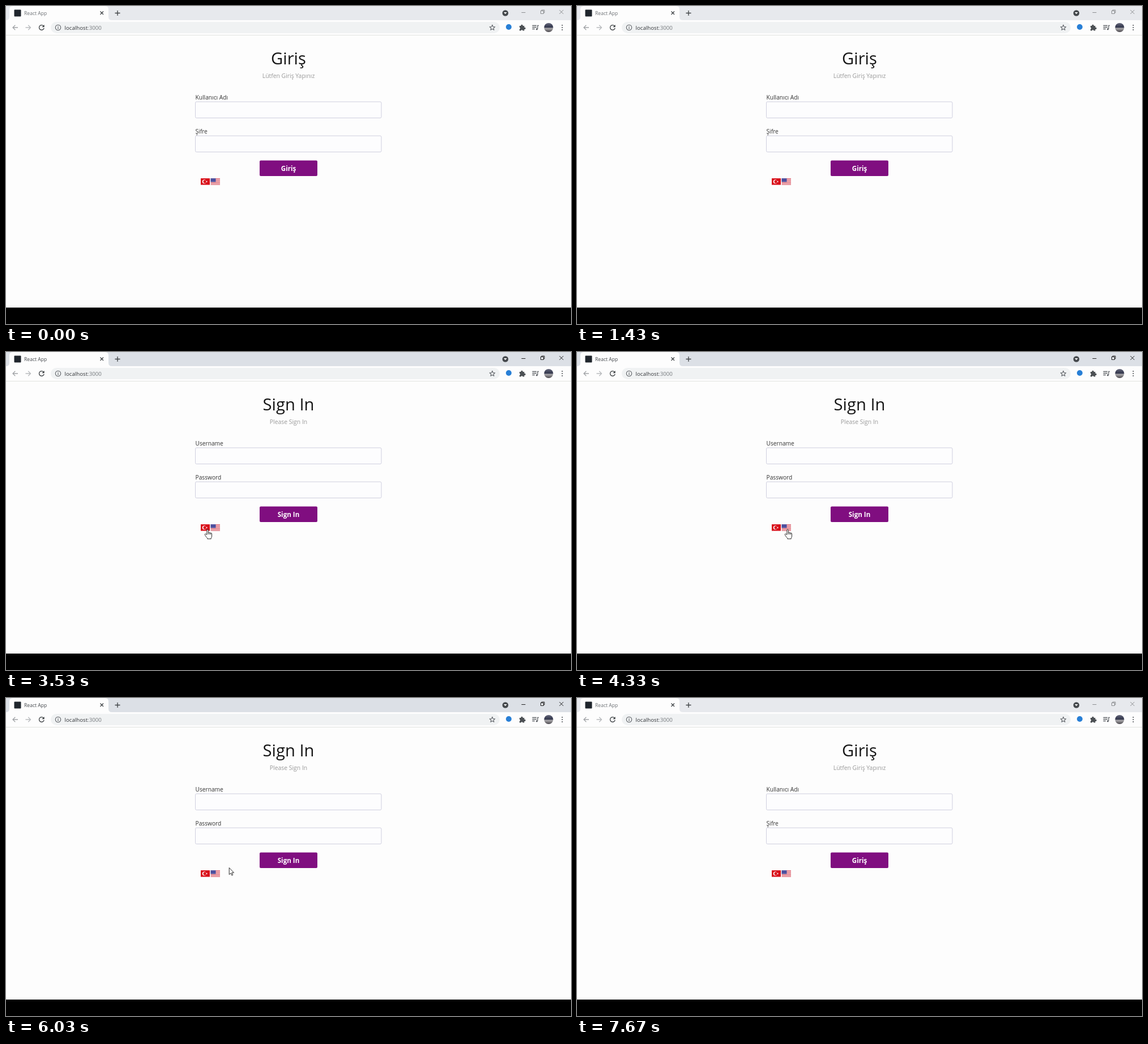
Recreate the animation shown at these times as an HTML page. Size 998 px wide and 561 px high, loop 7.74 s.

```html
<!DOCTYPE html>
<html lang="en">
<head>
<meta charset="utf-8">
<title>Login form</title>
<style>
  html, body { margin: 0; width: 100%; height: 100%; overflow: hidden; background: #000; }
  svg { display: block; width: 998px; height: 561px; }
  text { font-family: "Open Sans", "Noto Sans", sans-serif; }
  .line { fill: none; stroke: #5f6368; stroke-width: 1.3; }
  .mid { text-anchor: middle; }
  .label { font-size: 10.2px; fill: #333; }
  .field { fill: #fdfdfe; stroke: #cfcfdf; }
</style>
</head>
<body>
<svg viewBox="0 0 998 561">
  <rect width="998" height="532" fill="#fdfdfd"/>

  <rect id="strip" width="998" height="26"/>
  <path d="M0 25q6 0 6-6V6q0-6 6-6h163q6 0 6 6v13q0 6 6 6z" fill="#fdfdfd"/>
  <rect y="25" width="998" height="26" fill="#fdfdfd"/>
  <path d="M0 51.5h998" stroke="#e2e3e0"/>
  <rect x="14.5" y="6.5" width="12" height="12" rx="1" fill="#20262d"/>
  <text id="tab" x="32" y="15.5" font-size="8.6">React App</text>
  <path class="line" d="M166.500 9.500l5.500 5.500m0-5.500l-5.500 5.500" style="stroke:#3c4043"/>
  <path class="line" d="M192.500 12.500h9m-4.500-4.500v9" style="stroke:#3c4043"/>
  <circle cx="882" cy="12.500" r="5.300" fill="#45494d"/>
  <path d="M879.200 11h5.600l-2.800 3.300z" fill="#fff"/>
  <path id="controls" fill="none" d="M910.500 11.500h7M944.500 8.500h5v5h-5zM946 8.500v-1.500h5v5h-1.500M977.500 7l7 7m0-7l-7 7"/>

  <rect x="79" y="28" width="793" height="20" rx="10" fill="#f0f2f3"/>
  <path class="line" style="stroke:#a0a3a6" d="M21 38h-9m4.300-4.300l-4.300 4.300 4.300 4.300"/>
  <path class="line" style="stroke:#b8babd" d="M34.500 38h9m-4.300-4.300l4.300 4.300-4.300 4.300"/>
  <path class="line" style="stroke:#3c4043" d="M66.200 35a4.400 4.400 0 1 0 1 4"/>
  <path d="M67.700 33v4.300h-4.300z" fill="#3c4043"/>
  <circle class="line" cx="92" cy="38" r="4.700" style="stroke-width:1.100"/>
  <path d="M92 37.200v3.600M92 35v1.300" stroke="#5f6368" stroke-width="1.200"/>
  <text x="103.500" y="41.500" font-size="9.700" fill="#33363a">localhost<tspan fill="#74787c">:3000</tspan></text>
  <path id="star" class="line" style="stroke-width:1.100" stroke-linejoin="round"/>
  <circle cx="888" cy="37" r="5" fill="#287fd6"/>
  <path fill="#4c5054" d="M907 35h2.600a1.700 1.700 0 1 1 3.200 0h2.700v2.800a1.700 1.700 0 1 1 0 3.200v2.500h-2.600a1.800 1.800 0 0 0-3.400 0H907v-2.600a1.800 1.800 0 0 0 0-3.400z"/>
  <path class="line" d="M929.500 34.500h7.500m-7.500 3h7.500m-7.500 3h4.500M941 34.500h-2v6"/>
  <circle cx="937.600" cy="40.800" r="1.600" fill="#5f6368"/>
  <linearGradient id="photo" x2="0" y2="1">
    <stop stop-color="#66697c"/><stop offset=".45" stop-color="#30344a"/>
    <stop offset=".6" stop-color="#aaa8ab"/><stop offset="1" stop-color="#47454a"/>
  </linearGradient>
  <circle cx="958.500" cy="38" r="8" fill="url(#photo)"/>
  <path d="M982.500 34v8.500" stroke="#505458" stroke-width="2.200" stroke-linecap="round" stroke-dasharray="0 4"/>

  <text id="title" class="mid" x="499" y="103" font-size="29.200" font-weight="500" fill="#151515"/>
  <text id="hint" class="mid" x="499" y="127" font-size="10.400" fill="#999"/>
  <text id="user" class="label" x="334.500" y="165"/>
  <rect class="field" x="334.500" y="169" width="328.500" height="28.500" rx="2"/>
  <text id="pass" class="label" x="334.500" y="225"/>
  <rect class="field" x="334.500" y="229" width="328.500" height="28.500" rx="2"/>
  <rect x="448" y="272.500" width="102" height="27.500" rx="2" fill="#800e80"/>
  <text id="submit" class="mid" x="499" y="291" font-size="11.600" font-weight="700" fill="#fff"/>

  <g transform="translate(344 304)">
    <rect width="16" height="11.500" fill="#d9101b"/>
    <circle cx="6.300" cy="5.800" r="3.500" fill="#fff"/>
    <circle cx="7.300" cy="5.800" r="2.800" fill="#d9101b"/>
    <circle cx="10.400" cy="5.800" r="1.100" fill="#fff"/>
  </g>
  <g transform="translate(361.500 304)">
    <rect width="16.500" height="11.500" fill="#fff"/>
    <path id="stripes" stroke="#d33b4b" stroke-width=".9"/>
    <rect width="9" height="6.400" fill="#4c509f"/>
  </g>

  <g id="cursor" fill="#fff" stroke="#222" stroke-width=".95" stroke-linejoin="round">
    <path id="arrow" d="M.4 .4v12l2.800-2.500 1.900 4 1.800-.8-1.900-4h3.700z"/>
    <path id="hand" d="M-1.200 9.500V1.300q0-1.300 1.200-1.300t1.200 1.300v4q1.300-.9 2.200.5 1.400-.8 2.100.6 2-.5 2 1.400v4.200q0 1.700-1.300 3.200v1.500h-6.500v-1.300q-1.600-1.300-4.400-5.800-.5-1.300.6-1.700 1.200-.3 2.900 1.600zM1.200 5.300v3.400M3.400 5.800v3M5.500 6.400v2.600"/>
  </g>
</svg>
<script>
const LOOP = 7740;
const $ = id => document.getElementById(id);

const TEXT = {
  tr: { title: "Giriş", hint: "Lütfen Giriş Yapınız", user: "Kullanıcı Adı", pass: "Şifre", submit: "Giriş" },
  en: { title: "Sign In", hint: "Please Sign In", user: "Username", pass: "Password", submit: "Sign In" }
};

// Pointer stops: time, x, y
const PATH = [
  [1750, 1000, 120], [2050, 372, 313], [2600, 372, 313], [3150, 356, 313],
  [3620, 356, 313], [3850, 372, 313], [4640, 372, 313], [4830, 489, 314],
  [5150, 798, 369], [5480, 798, 369], [5660, 661, 314], [6030, 394, 299],
  [6250, 356, 311], [6560, 356, 311], [7230, 560, 240], [7500, 1000, 20]
];

// Clicks on the flags: time, language
const CLICKS = [[0, "tr"], [2100, "en"], [3600, "tr"], [3930, "en"], [6450, "tr"]];
const FOCUS = [2100, 7450];

const starPoints = Array.from({ length: 10 }, (_, i) => {
  const r = i % 2 ? 2.2 : 5, a = i * Math.PI / 5;
  return `${859 + r * Math.sin(a)} ${38.3 - r * Math.cos(a)}`;
});
$("star").setAttribute("d", `M${starPoints.join("L")}z`);
$("stripes").setAttribute("d", Array.from({ length: 7 }, (_, i) => `M0 ${0.45 + i * 1.77}h16.5`).join(""));

function pointerAt(t) {
  const i = PATH.findIndex(stop => stop[0] > t);
  if (i < 1) return null;
  const [t0, x0, y0] = PATH[i - 1], [t1, x1, y1] = PATH[i];
  const k = (t - t0) / (t1 - t0);
  return [x0 + (x1 - x0) * k, y0 + (y1 - y0) * k];
}

const show = (id, on) => $(id).setAttribute("visibility", on ? "visible" : "hidden");

let language;
function setLanguage(next) {
  if (next === language) return;
  language = next;
  for (const id in TEXT[next]) $(id).textContent = TEXT[next][id];
}

function render(t) {
  setLanguage(CLICKS.filter(([time]) => time <= t).pop()[1]);

  const focused = t >= FOCUS[0] && t < FOCUS[1];
  $("strip").setAttribute("fill", focused ? "#dce0e6" : "#e7e9ed");
  $("tab").setAttribute("fill", focused ? "#45494d" : "#6c7074");
  $("controls").setAttribute("stroke", focused ? "#222" : "#8c8e91");

  const pointer = pointerAt(t);
  const [x, y] = pointer || [0, 0];
  const overFlag = x > 344 && x < 378 && y > 304 && y < 316;
  $("cursor").setAttribute("transform", `translate(${x} ${y})`);
  show("arrow", pointer && !overFlag);
  show("hand", pointer && overFlag);
}

const start = performance.now();
function tick() {
  render((performance.now() - start) % LOOP);
  requestAnimationFrame(tick);
}
tick();
</script>
</body>
</html>
```
